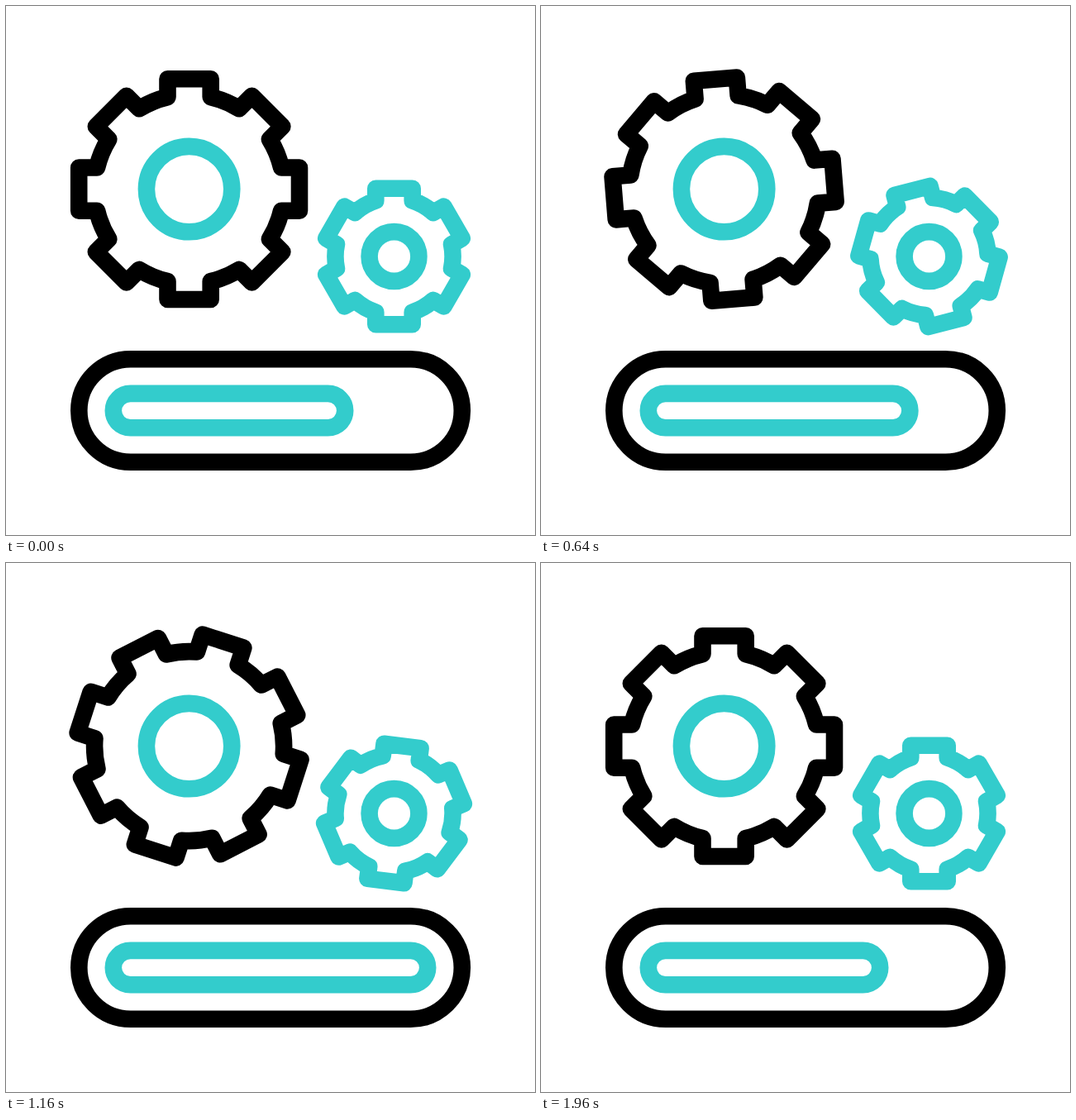
Write an HTML page that moves like this. It is 640 px wide and 640 px high and loops after 2000 ms.

```html
<!DOCTYPE html>
<html>
<head>
<meta charset="utf-8">
<title>Gears and progress bar</title>
<style>
  html, body { margin: 0; width: 100%; height: 100%; overflow: hidden; background: #fff; }
  svg { display: block; width: 100%; height: 100%; }
</style>
</head>
<body>
<svg viewBox="0 0 640 640" fill="none" stroke="#33cccc" stroke-width="20.6" stroke-linejoin="round">
  <path id="big" stroke="#000"/>
  <circle cx="221.6" cy="221.6" r="51.7"/>
  <path id="small"/>
  <circle cx="469.5" cy="303" r="29.9"/>
  <rect x="88.3" y="427.2" width="463.5" height="124.6" rx="62.3" stroke="#000"/>
  <rect id="bar" x="129.8" y="468.9" height="41.4" rx="20.7"/>
</svg>
<script>
const $ = id => document.getElementById(id);
const LOOP = 2000, STEP = 40;

// Outline of a gear around the origin: straight teeth joined by arcs.
function gearPath(teeth, half, tip, base) {
  const r = Math.hypot(half, base);
  let d = '';
  for (let i = 0; i < teeth; i++) {
    const a = i * 2 * Math.PI / teeth, c = Math.cos(a), s = Math.sin(a);
    const at = (x, y) => `${(x * c - y * s).toFixed(2)} ${(x * s + y * c).toFixed(2)}`;
    d += (i ? `A${r} ${r} 0 0 1 ` : 'M') + at(-half, -base) +
      'L' + at(-half, -tip) + 'L' + at(half, -tip) + 'L' + at(half, -base);
  }
  return d + `A${r} ${r} 0 0 1 ${-half} ${-base}Z`;
}

// Cubic Bezier easing with handles (x1, 0) and (x2, y2).
function ease(x, x1, x2, y2) {
  if (x <= 0) return 0;
  if (x >= 1) return 1;
  const curve = (s, a, b) => 3 * a * s * (1 - s) ** 2 + 3 * b * s * s * (1 - s) + s ** 3;
  let lo = 0, hi = 1;
  for (let i = 0; i < 24; i++) {
    const mid = (lo + hi) / 2;
    if (curve(mid, x1, x2) < x) lo = mid; else hi = mid;
  }
  return curve(lo, 0, y2);
}

const span = (t, from, to) => (t - from) / (to - from);

function draw(t) {
  if (t < 2 * STEP) t = 0;
  const big = 540 * ease(span(t, 0, 1640), .347, .679, 1);
  const small = -660 * ease(span(t, 300, 1960), .324, .662, 1);
  const fill = ease(span(t, 148, 1153), 1 / 3, 2 / 3, 2 / 3) -
    ease(span(t, 1153, 1955), 1 / 3, 2 / 3, 1 / 3);
  $('big').setAttribute('transform', `translate(221.6 221.6) rotate(${big})`);
  $('small').setAttribute('transform', `translate(469.5 303) rotate(${small})`);
  $('bar').setAttribute('width', 280.4 + 100 * fill);
}

$('big').setAttribute('d', gearPath(8, 26.1, 133.4, 111.5));
$('small').setAttribute('d', gearPath(6, 22.2, 82.2, 67.5));

const start = performance.now();
function tick() {
  const t = (performance.now() - start) % LOOP;
  draw(Math.floor(t / STEP) * STEP);
  requestAnimationFrame(tick);
}
tick();
</script>
</body>
</html>
```
